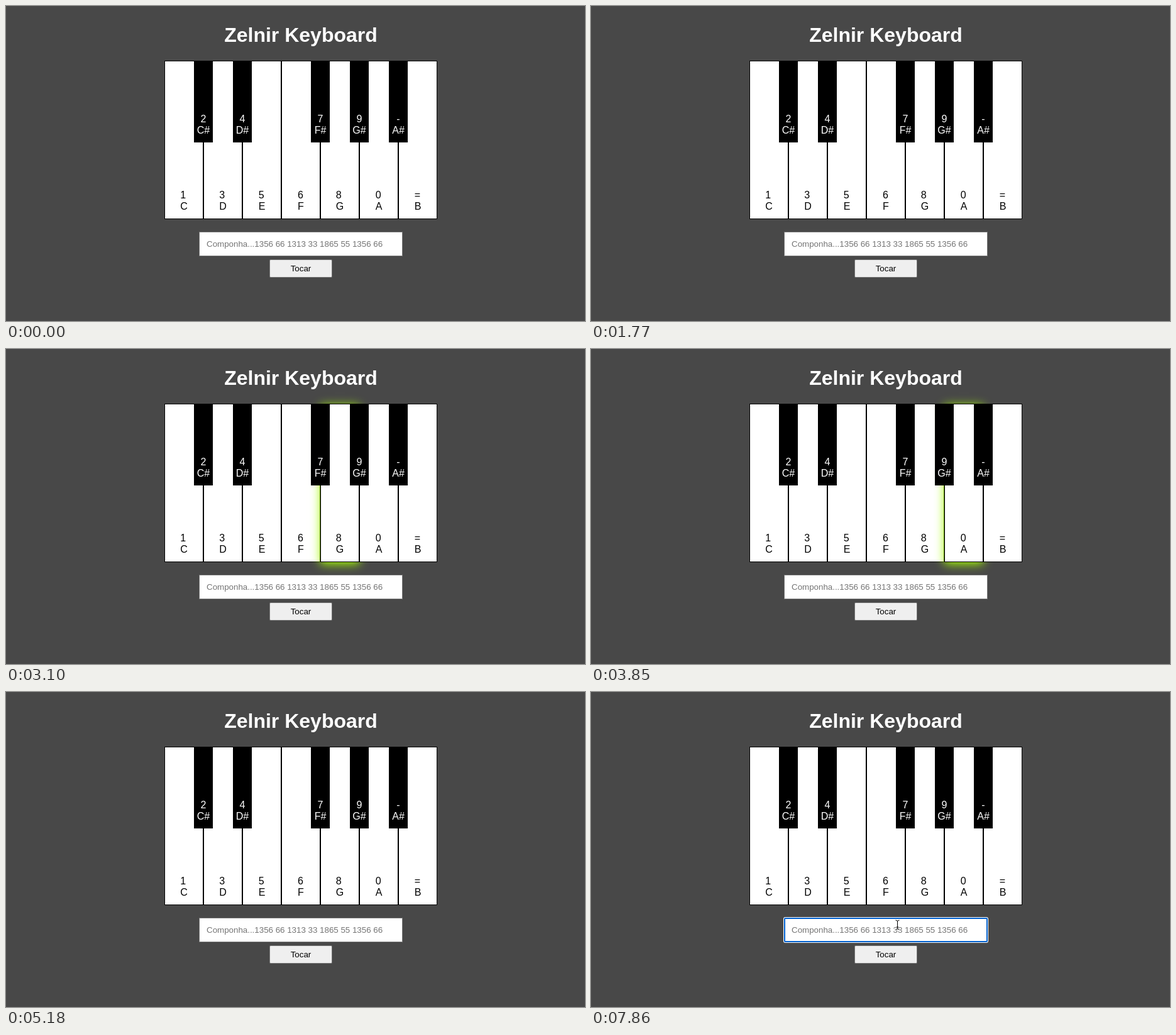
Write an HTML page with a canvas that moves like this. It is 921x501 px and loops after 8 s.

```html
<!DOCTYPE html>
<html lang="pt">
<head>
<meta charset="utf-8">
<title>Zelnir Keyboard</title>
<style>
  html, body { margin: 0; width: 100%; height: 100%; overflow: hidden; background: #484848; }
  canvas { display: block; width: 921px; height: 501px; }
</style>
</head>
<body>
<canvas id="stage" width="921" height="501"></canvas>
<script>
const ctx = document.getElementById('stage').getContext('2d');
const LOOP = 8000;
const FONT = '"Liberation Sans", Arial, sans-serif';
const TOP = 87;
const WHITE = { width: 62, height: 252 };
const BLACK = { width: 30, height: 130 };

// Digit, note and left edge of each key
const whiteKeys = ['1C', '3D', '5E', '6F', '8G', '0A', '=B'].map((s, i) => ({
  digit: s[0], note: s[1], x: 252 + i * WHITE.width
}));
const blackKeys = [['2', 'C#', 1], ['4', 'D#', 2], ['7', 'F#', 4], ['9', 'G#', 5], ['-', 'A#', 6]]
  .map(([digit, note, gap]) => ({ digit, note, x: 252 + gap * WHITE.width - 15 }));

// Note, pressed at, released at
const presses = [
  ['C#', 440, 740], ['D', 1030, 1330], ['D#', 1480, 1770], ['E', 1920, 2220],
  ['F', 2220, 2510], ['F#', 2660, 2950], ['G', 3100, 3400], ['G#', 3400, 3700],
  ['A', 3850, 4140], ['A#', 4290, 4580], ['B', 4880, 5180]
];

const HOVER = 6080, MOVE = 6230, FOCUS = 6370;

function rect(color, x, y, w, h) {
  ctx.fillStyle = color;
  ctx.fillRect(x, y, w, h);
}

function roundRect(color, x, y, w, h, r) {
  ctx.fillStyle = color;
  ctx.beginPath();
  ctx.roundRect(x, y, w, h, r);
  ctx.fill();
}

function text(str, x, y, size, color, align = 'center', weight = '') {
  ctx.font = `${weight} ${size}px ${FONT}`;
  ctx.textAlign = align;
  ctx.fillStyle = color;
  ctx.fillText(str, x, y);
}

function keyBody(x, size, lit) {
  ctx.save();
  if (lit) {
    ctx.shadowColor = '#a6ff00';
    ctx.shadowBlur = 15;
    ctx.shadowOffsetY = 3;
  }
  rect('#000', x, TOP, size.width, size.height);
  ctx.restore();
}

function drawWhite(key, lit) {
  keyBody(key.x, WHITE, lit);
  rect('#fff', key.x + 1, TOP + 1, WHITE.width - 2, WHITE.height - 2);
  ctx.font = `16px ${FONT}`;
  const left = key.x + (WHITE.width - ctx.measureText(key.note).width) / 2;
  text(key.digit, left, 306, 16, '#000', 'left');
  text(key.note, left, 324, 16, '#000', 'left');
}

function drawBlack(key, lit) {
  keyBody(key.x, BLACK, lit);
  const mid = key.x + BLACK.width / 2;
  text(key.digit, mid, 185, 16, '#fff');
  text(key.note, mid, 203, 16, '#fff');
}

function drawInput(t) {
  if (t >= FOCUS) {
    roundRect('#fff', 306, 358, 326, 41, 3);
    roundRect('#005fcc', 307, 359, 324, 39, 2);
    rect('#fff', 309, 361, 320, 35);
  } else {
    if (t < HOVER) rect('#767676', 307, 359, 324, 39);
    rect('#fff', 308, 360, 322, 37);
  }
  text('Componha...1356 66 1313 33 1865 55 1356 66', 319, 383, 13.3333, '#757575', 'left');
  const caret = (t >= FOCUS && t < 6820) || (t >= 7270 && t < 7860);
  if (caret) rect('#000', 319, 371, 1, 15);
}

function drawButton() {
  roundRect('#767676', 419, 403, 100, 29, 2);
  roundRect('#efefef', 420, 404, 98, 27, 1);
  text('Tocar', 469, 422, 13.3333, '#000');
}

function drawPointer(x, y) {
  ctx.beginPath();
  for (const s of [-1, 1]) {
    ctx.moveTo(x - 3, y + s * 7.5);
    ctx.quadraticCurveTo(x, y + s * 7.5, x, y + s * 5.5);
    ctx.quadraticCurveTo(x, y + s * 7.5, x + 3, y + s * 7.5);
  }
  ctx.moveTo(x, y - 6);
  ctx.lineTo(x, y + 6);
  ctx.moveTo(x - 2, y + 3.5);
  ctx.lineTo(x + 2, y + 3.5);
  for (const [color, width] of [['#fff', 2.6], ['#000', 1]]) {
    ctx.strokeStyle = color;
    ctx.lineWidth = width;
    ctx.stroke();
  }
}

function draw(t) {
  const isLit = key => presses.some(([note, on, off]) => note === key.note && t >= on && t < off);
  rect('#484848', 0, 0, 921, 501);
  text('Zelnir Keyboard', 469, 57, 32, '#fff', 'center', 'bold');
  whiteKeys.forEach(key => drawWhite(key, isLit(key)));
  blackKeys.forEach(key => drawBlack(key, isLit(key)));
  drawInput(t);
  drawButton();
  if (t >= HOVER) drawPointer(487.5, t < MOVE ? 376.5 : 370.5);
}

const start = performance.now();
function tick() {
  draw((performance.now() - start) % LOOP);
  requestAnimationFrame(tick);
}
tick();
</script>
</body>
</html>
```
